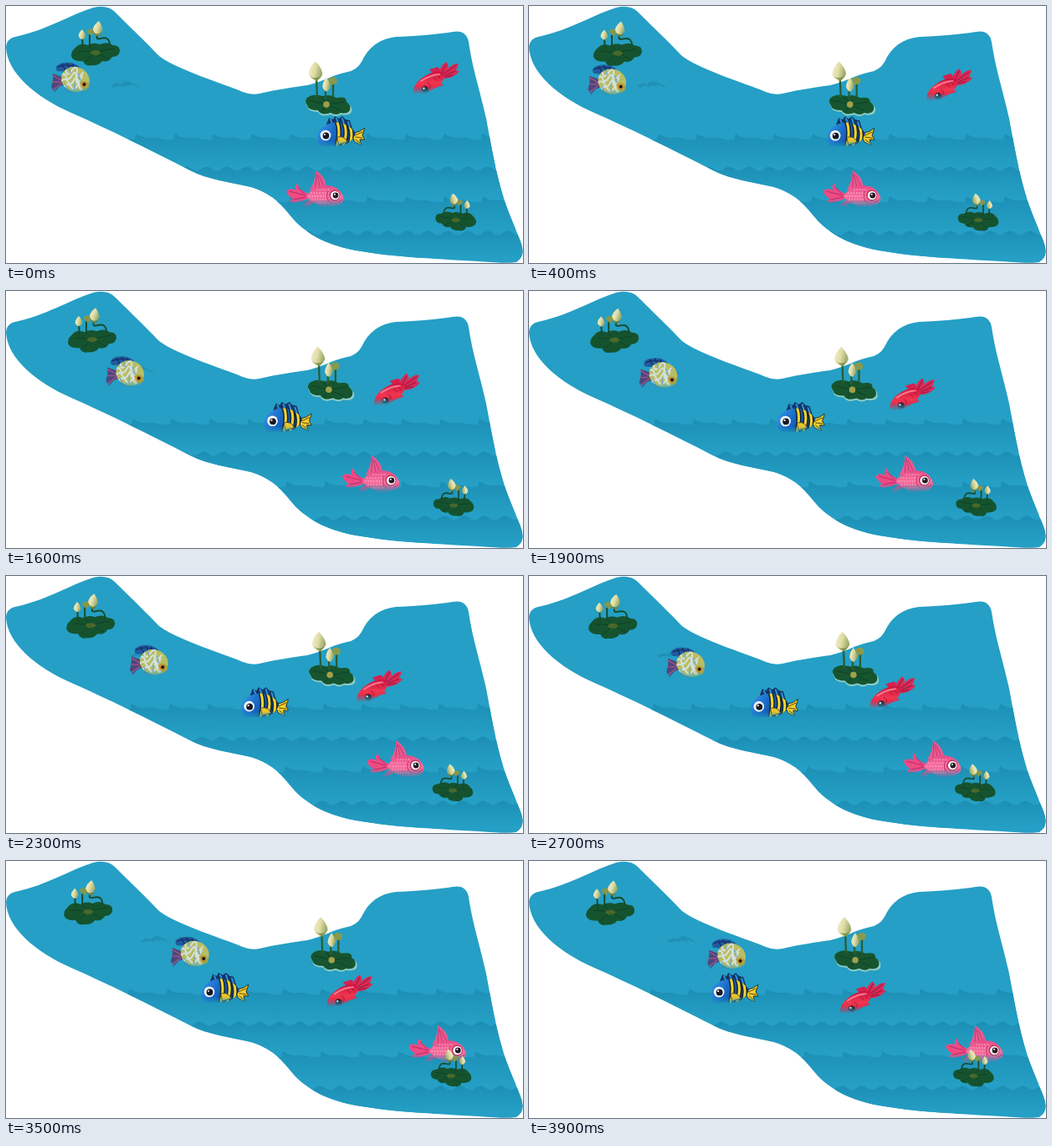
Recreate the animation shown at these times as an HTML page. Size 618x308 px, loop 4 s.

```html
<!DOCTYPE html>
<html lang="en">
<head>
<meta charset="utf-8">
<title>Lotus pond</title>
<style>
html, body { margin: 0; width: 100%; height: 100%; overflow: hidden; background: #fff }
svg { display: block }
path, ellipse, circle { stroke-linecap: round; stroke-linejoin: round }
.line { fill: none }
</style>
</head>
<body>
<svg width="618" height="308" viewBox="0 0 618 308">
<defs>
  <linearGradient id="shade" x2="0" y2="1">
    <stop stop-color="#1c8db3"/><stop offset=".25" stop-color="#1f94ba"/><stop offset="1" stop-color="#259fc5"/>
  </linearGradient>
  <linearGradient id="dip" x2="0" y2="1">
    <stop offset=".76" stop-color="#fff"/><stop offset="1" stop-color="#fff" stop-opacity="0"/>
  </linearGradient>
  <linearGradient id="blue" x2="1" y2=".4">
    <stop stop-color="#3d9df0"/><stop offset=".5" stop-color="#1768c4"/><stop offset="1" stop-color="#123f8c"/>
  </linearGradient>
  <linearGradient id="red" x2="0" y2="1">
    <stop stop-color="#c91542"/><stop offset=".5" stop-color="#f0364f"/><stop offset="1" stop-color="#d91b3c"/>
  </linearGradient>
  <linearGradient id="pink" x2="0" y2="1">
    <stop stop-color="#e64a86"/><stop offset=".5" stop-color="#f6709f"/><stop offset="1" stop-color="#ef5488"/>
  </linearGradient>
  <linearGradient id="petal" x2="1" y2=".3">
    <stop stop-color="#f6f0cd"/><stop offset=".55" stop-color="#dfdca5"/><stop offset="1" stop-color="#9cab69"/>
  </linearGradient>
  <mask id="sink" maskContentUnits="objectBoundingBox"><rect width="1" height="1" fill="url(#dip)"/></mask>
  <path id="edge" d="M0 49C1 40 6 38 15 36C50 28 78 10 104 2Q121-2 130 7C150 27 166 42 181 58C197 74 265 95 283 103Q293 107 303 105C324 100 345 97 360 95C378 91 392 82 408 79Q419 77 425 67C433 49 447 39 466 37C493 36 514 34 534 31Q550 28 553 43C558 77 566 99 574 135C582 178 588 215 602 250L615 282Q622 300 610 307Q601 309 565 306C515 303 464 301 425 294C379 287 355 270 339 250C326 233 311 222 293 217C266 211 242 208 220 197C170 171 121 147 78 128C35 109 1 80 0 49Z"/>
  <clipPath id="shore"><use href="#edge"/></clipPath>
  <clipPath id="discBody"><ellipse cx="29" cy="21" rx="17" ry="15" transform="rotate(18 29 21)"/></clipPath>
  <clipPath id="stripeBody"><path d="M0 24Q3 13 14 9Q32 3 46 20Q42 33 27 36L4 36Q0 31 0 24Z"/></clipPath>
  <path id="bud" d="M0-9Q6-2 6 3Q4 8 0 9Q-4 8-6 3Q-6-3 0-9Z" fill="url(#petal)"/>

  <g id="lily">
    <path d="M4 33Q10 25 20 29Q27 25 34 28Q43 24 50 29Q58 29 58 36Q57 43 49 43Q45 50 37 48Q33 54 24 53Q17 55 14 48Q2 49 0 42Q0 36 4 33Z" fill="#15532f"/>
    <path class="line" d="M29 37L9 36M29 37L18 48M29 37L45 46M29 37L51 33M29 37L21 29" stroke="#0e4024"/>
    <ellipse cx="29" cy="38" rx="6" ry="3" fill="#49682a"/>
    <path class="line" d="M13 20L14 34M22 17V31M32 15Q28 23 35 21Q46 18 46 29" stroke="#174b2c" stroke-width="2"/>
    <use href="#bud" transform="translate(13 16) scale(.72 .68)"/>
    <path d="M18 12Q24 6 30 12L24 18Z" fill="#84974d"/>
    <use href="#bud" transform="translate(32 8) rotate(8) scale(.95 .9)"/>
    <path d="M27 14Q33 18 37 13L34 18H30Z" fill="#6b8445"/>
  </g>

  <g id="tallLily">
    <path d="M3 45Q10 39 22 43Q30 40 38 45Q51 43 50 50Q58 54 56 61Q53 66 43 64Q38 68 31 64Q20 68 16 61Q4 61 3 54Q-1 49 3 45Z" fill="#8dcdc7"/>
    <path d="M3 44Q10 38 22 42Q30 39 38 44Q51 42 50 49Q56 53 54 59Q51 64 43 62Q38 66 31 62Q20 66 16 59Q4 59 3 53Q-1 48 3 44Z" fill="#16552f"/>
    <path class="line" d="M26 52L6 47M26 52L20 43M26 52L21 60M26 52L43 59M26 52L47 49" stroke="#0f4226"/>
    <circle cx="26" cy="52" r="3.8" fill="#a1a04a"/>
    <path class="line" d="M14 20L15 43M25 33V45M34 26V42" stroke="#285d36" stroke-width="2.3"/>
    <use href="#bud" transform="translate(13 12) scale(1.38 1.3)"/>
    <path d="M6 18Q14 23 20 17L15 24Z" fill="#7d9350"/>
    <path d="M28 22Q34 16 39 22L38 27L30 29Z" fill="#879a4d"/>
    <use href="#bud" transform="translate(26 28) scale(.78 .94)"/>
  </g>

  <g id="discus" mask="url(#sink)">
    <path d="M13 18L2 14Q3 22 0 30L4 37L9 30L16 27Z" fill="#4c477f"/>
    <path class="line" d="M2 16L12 22M2 24L11 24M3 33L12 26" stroke="#aa527e" stroke-width="1.3"/>
    <path d="M7 11Q3 5 11 2Q31-4 41 16L31 13Z" fill="#215b9d"/>
    <path class="line" d="M8 6Q26-1 38 14M13 3L17 10M19 2L22 8M26 3L28 9" stroke="#172d66" stroke-width="1.3"/>
    <path d="M16 32Q23 39 34 36L30 31Z" fill="#447ca6"/>
    <g clip-path="url(#discBody)">
      <path d="M8 2H50V40H8Z" fill="#b8bd62"/>
      <path class="line" d="M12 11Q17 6 18 12T25 10T31 12T38 13M11 17Q16 12 18 18T25 16T30 20T37 17M12 23Q17 18 20 24T27 22T33 27T40 25M15 30Q21 24 24 30T31 29T38 32" stroke="#d3e1dc" stroke-width="2"/>
      <path class="line" d="M21 7L23 13M32 14L35 22M17 27L20 33M28 25V33" stroke="#7baac2" stroke-width="1.6"/>
    </g>
    <path d="M34 25Q40 20 45 26Q47 31 39 35Z" fill="#a4a44b"/>
    <circle cx="39" cy="27" r="3.3" fill="#d4882c"/><circle cx="39.5" cy="27" r="2" fill="#171713"/>
  </g>

  <g id="striped" mask="url(#sink)">
    <path d="M11 10L14 2L19 4L21 0L26 3L30 0L34 4L39 5L43 18Z" fill="#153565"/>
    <path class="line" d="M16 4L18 9M23 3L25 8M30 3L32 9M37 7L39 13" stroke="#2993dc" stroke-width="2"/>
    <path d="M41 21L51 18L57 14L54 23L57 28L51 28L53 35L45 31Z" fill="#f5ce28" stroke="#26302f"/>
    <path class="line" d="M45 23L54 19M46 25L54 26M46 28L51 32" stroke="#534e23"/>
    <g clip-path="url(#stripeBody)">
      <path d="M0 5H48V38H0Z" fill="url(#blue)"/>
      <path class="line" d="M24 7Q28 18 24 35M32 8Q37 19 31 36M39 12Q43 22 39 34" stroke="#152331" stroke-width="6"/>
      <path class="line" d="M24 7Q28 18 24 35M32 8Q37 19 31 36M39 12Q43 22 39 34" stroke="#f4d52d" stroke-width="3"/>
    </g>
    <path d="M24 25Q33 23 36 31L26 34Z" fill="#eec326" stroke="#283b49" stroke-width=".8"/>
    <circle cx="10" cy="23" r="6.3" fill="#f4faff"/><circle cx="10.5" cy="23.5" r="3.9" fill="#171824"/><circle cx="9" cy="22" r="1.1" fill="#fff"/>
  </g>

  <g id="redFish" mask="url(#sink)">
    <path d="M24 14L20 9L30 6L36 12Z" fill="#d62050"/>
    <path d="M31 13Q33 5 40 0Q44 4 42 8Q49 1 55 2L52 10L56 11Q49 20 37 20Z" fill="#d82b55"/>
    <path class="line" d="M35 13L40 3M38 14L52 4M39 16L51 11M38 18L48 16" stroke="#8e1741"/>
    <path d="M24 32L37 28L31 23Z" fill="#cb3862"/>
    <path d="M1 35Q2 24 16 16Q29 9 38 13Q40 23 26 32Q11 41 1 38Z" fill="url(#red)"/>
    <path class="line" d="M10 23Q22 15 32 15" stroke="#f9798e" stroke-width="2"/>
    <path class="line" d="M18 25Q24 28 20 32M25 19L29 22M31 16L33 20" stroke="#b51138"/>
    <circle cx="15" cy="33" r="4.5" fill="#9b1937"/><circle cx="14.8" cy="33" r="3.5" fill="#262027"/><circle cx="13.5" cy="31.8" r="1.2" fill="#fff"/>
  </g>

  <g id="pinkFish" mask="url(#sink)">
    <path d="M27 29L16 22L13 15Q9 21 12 24Q4 20 0 25Q1 30 8 34Q3 36 5 38Q14 40 28 33Z" fill="#ee4b83"/>
    <path class="line" d="M14 20L22 28M4 25L23 30M9 35L24 32" stroke="#b72a67"/>
    <path d="M28 23Q35 13 35 0Q48 8 48 22Z" fill="#e95a91"/>
    <path class="line" d="M36 3L35 20M37 5L40 19M39 6L45 19" stroke="#bd396f"/>
    <path d="M28 35L19 42L24 45L34 38M42 38L39 45L49 43L52 38Z" fill="#e44d84"/>
    <path d="M24 32Q29 20 44 18Q61 17 67 29Q72 38 61 42Q41 48 24 32Z" fill="url(#pink)"/>
    <path class="line" d="M30 27H50M28 31H50M31 35H50M37 39H53M37 23H51" stroke="#ffb0c8" stroke-width="1.5" stroke-dasharray=".1 3.2"/>
    <path class="line" d="M50 25Q46 33 52 39M62 38Q65 37 67 35" stroke="#c52f66"/>
    <circle cx="58" cy="30" r="6.4" fill="#b72c52"/><circle cx="58.3" cy="30" r="5.3" fill="#fff"/><circle cx="59" cy="30" r="3.4" fill="#241925"/><circle cx="58" cy="28.7" r="1" fill="#fff"/>
  </g>
</defs>

<use href="#edge" fill="#259fc5"/>
<g clip-path="url(#shore)">
  <g id="waves" fill="url(#shade)"></g>
</g>
<g id="actors"></g>
</svg>
<script>
const NS = 'http://www.w3.org/2000/svg';
const LOOP = 4000, STEP = 100;
const waves = document.getElementById('waves');
const actors = document.getElementById('actors');

function add(parent, tag, attributes) {
  const node = document.createElementNS(NS, tag);
  for (const key in attributes) node.setAttribute(key, attributes[key]);
  return parent.appendChild(node);
}

const crest = 'l2-7q8 6 16 5t14 1t14 1';
const ripple = 'q6-5 12 0t12 0';
function band(y, shape, period, depth) {
  const count = Math.ceil(740 / period);
  add(waves, 'path', { d: `M-30 ${y}${shape.repeat(count)}v${depth}H-30Z` });
}
band(160, crest, 46, 33);
band(195, ripple, 24, 34);
band(235, crest, 46, 33);
band(272, ripple, 24, 30);

const shadow = add(actors, 'path', {
  d: 'M0 8Q7 2 12 6Q18-1 25 4Q32 6 37 13Q27 5 22 7L27 12Q19 5 15 9Q8 6 4 10Z',
  fill: '#1d86aa', opacity: .55
});

// Start position, then drift per step
const movers = [
  { node: shadow, x: 125, y: 88, dx: 1.03, dy: 0 },
  ...[
    ['lily', 78, 18, -.25, .14],
    ['tallLily', 357, 66, .18, .02],
    ['discus', 54, 67, 4.08, .66],
    ['striped', 372, 132, -3.97, .05],
    ['redFish', 486, 67, -2.95, 1.98],
    ['pinkFish', 335, 197, 4.18, 0],
    ['lily', 562, 224.5, -.16, .03, 'scale(-.84 .84)']
  ].map(([id, x, y, dx, dy, pose = '']) =>
    ({ node: add(actors, 'use', { href: '#' + id }), x, y, dx, dy, pose }))
];

function draw() {
  const step = Math.floor(performance.now() % LOOP / STEP);
  for (const { node, x, y, dx, dy, pose = '' } of movers)
    node.setAttribute('transform', `translate(${x + dx * step} ${y + dy * step}) ${pose}`);
  waves.setAttribute('transform', `translate(${-.25 * step} 0)`);
  requestAnimationFrame(draw);
}
draw();
</script>
</body>
</html>
```
